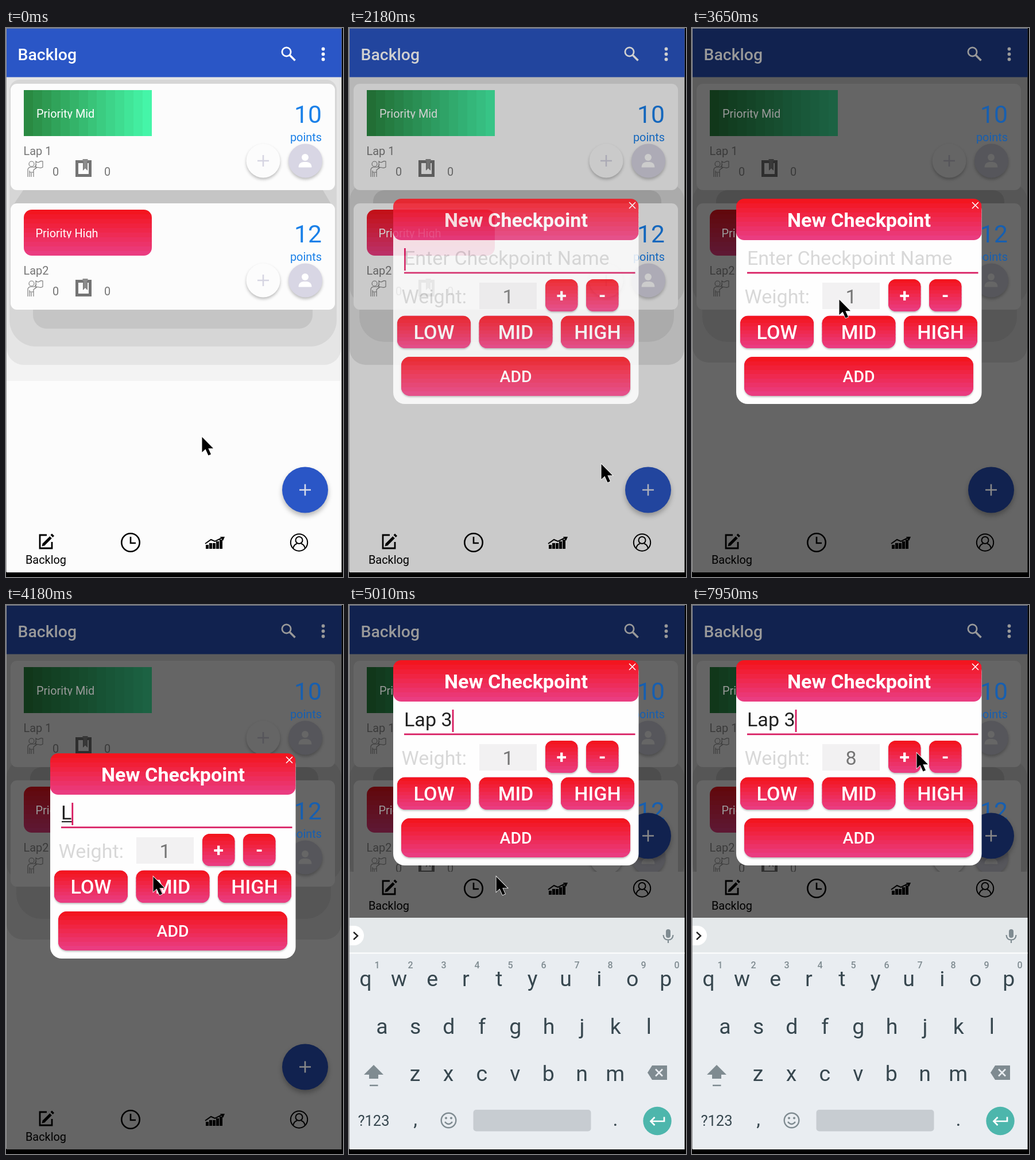
An HTML page with a canvas for the animation above (8 s loop, 587 px wide and 955 px high).

```html
<!DOCTYPE html>
<html lang="en">
<head>
<meta charset="utf-8">
<title>Backlog</title>
<style>
html, body { margin: 0; width: 100%; height: 100%; overflow: hidden; background: #000; }
canvas { display: block; }
</style>
</head>
<body>
<canvas id="stage" width="587" height="955"></canvas>
<script>
const W = 587, H = 955, LOOP = 8000, RESIZE = 402;
const stage = document.getElementById('stage').getContext('2d');
const layerCanvas = Object.assign(document.createElement('canvas'), { width: W, height: H });
const layer = layerCanvas.getContext('2d');
let g = stage;
let dim = 0;

// Timelines: each entry holds from its time until the next one.
const POINTER = [
  [0, 341, 711], [150, 336, 735], [270, 327, 762], [390, 343, 757],
  [540, 398, 752], [660, 446, 746], [780, 482, 738], [930, 492, 730],
  [1050, 500, 725], [1210, 500, 784], [1350, 525, 775], [1470, 525, 769],
  [1620, 513, 793], [2180, 439, 758], [2330, 306, 600], [2450, 258, 495],
  [2600, 256, 472], [5970, 292, 405], [6090, 343, 326], [6240, 342, 292],
  [6360, 341, 270], [6480, 344, 262], [6630, 368, 258], [6750, 391, 257]
];
const LEVEL = [[0, 0], [2180, 1], [2330, 2]];
const DIALOG_Y = [[0, 297], [4180, 258], [4300, 110], [4450, 96]];
const KEYBOARD_Y = [[0, H], [4300, 640], [4450, 544]];
const ENTRY = [[0, ''], [4180, 'L'], [5010, 'Lap 3']];
const CARET = [[0, 1], [2600, 0], [3130, 1], [3650, 0], [4180, 1], [5410, 0],
  [5970, 1], [6480, 0], [6870, 1], [7410, 0], [7950, 1]];
const WEIGHT = [[0, 1], [6870, 2], [6990, 3], [7140, 4], [7410, 5], [7560, 6], [7680, 7], [7950, 8]];
const at = (list, t) => list.findLast(e => e[0] <= t);

const DIMS = [0, 0.2, 0.6];
const INKS = [
  { white: '#fff', blue: '#1a80e8', grey: '#757575' },
  { white: '#d0d0d0', blue: '#1467bd', grey: '#646464' },
  { white: '#999', blue: '#175fb0', grey: '#3a3a3a' }
];
const RED = ['#f3151f', '#ea3c80'];
const GREEN = ['#2a8a42', '#45f5a8'];

const rgb = hex => [1, 3, 5].map(i => parseInt(hex.slice(i, i + 2), 16));
const css = c => `rgb(${c.map(v => Math.round(v * (1 - dim)))})`;
const shade = hex => css(rgb(hex));

function rect(x, y, w, h, color, r = 0) {
  g.fillStyle = color;
  g.beginPath();
  g.roundRect(x, y, w, h, r);
  g.fill();
}

function disc(x, y, r, color) {
  g.fillStyle = color;
  g.beginPath();
  g.arc(x, y, r, 0, 7);
  g.fill();
}

function ring(x, y, r, color, width) {
  g.strokeStyle = color;
  g.lineWidth = width;
  g.beginPath();
  g.arc(x, y, r, 0, 7);
  g.stroke();
}

function line(d, color, width) {
  g.strokeStyle = color;
  g.lineWidth = width;
  g.stroke(new Path2D(d));
}

function shape(d, color) {
  g.fillStyle = color;
  g.fill(new Path2D(d), 'evenodd');
}

function text(s, x, y, size, color, align = 'left', weight = 400) {
  g.font = `${weight} ${size}px Roboto, sans-serif`;
  g.textAlign = align;
  g.fillStyle = color;
  g.fillText(s, x, y);
}

function shadowed(blur, dy, alpha, draw) {
  g.save();
  g.shadowColor = `rgba(0,0,0,${alpha})`;
  g.shadowBlur = blur;
  g.shadowOffsetY = dy;
  draw();
  g.restore();
}

function bands(x, y, w, h, r, [from, to], n, across) {
  const a = rgb(from), b = rgb(to);
  g.save();
  g.beginPath();
  g.roundRect(x, y, w, h, r);
  g.clip();
  for (let i = 0; i < n; i++) {
    const k = i / (n - 1);
    g.fillStyle = css(a.map((v, j) => v + (b[j] - v) * k));
    if (across) g.fillRect(Math.round(x + w * i / n), y, Math.ceil(w / n) + 1, h);
    else g.fillRect(x, Math.round(y + h * i / n), w, Math.ceil(h / n) + 1);
  }
  g.restore();
}

function plus(x, y, r, color, width) {
  line(`M${x - r} ${y}h${2 * r}M${x} ${y - r}v${2 * r}`, color, width);
}

function listShadow(level) {
  if (!level) {
    rect(1, 85, 583, 529, shade('#f3f3f3'));
    rect(1, 85, 583, 501, shade('#e5e5e5'), [0, 0, 30, 30]);
    rect(6, 90, 570, 464, shade('#d6d6d6'), [18, 18, 46, 46]);
    shape('M30 282H552L566 306H14Z', shade('#c5c5c5'));
    rect(47, 480, 487, 43, shade('#c5c5c5'), [0, 0, 24, 24]);
    return;
  }
  const bottom = level === 1 ? 586 : 582;
  rect(1, 85, 583, bottom - 85, shade('#e5e5e5'), [0, 0, 28, 28]);
  rect(1, 270, 583, 210, shade('#d6d6d6'), 30);
  rect(18, 470, 548, 76, shade('#d6d6d6'), [0, 0, 44, 44]);
  rect(42, 282, 502, 24, shade('#c0c0c0'), [20, 20, 0, 0]);
}

function card(y, label, name, points, ink, green) {
  rect(8, y, 565, 185, shade('#fcfcfc'), 11);
  if (green) bands(31, y + 11, 223, 80, 0, GREEN, 14, true);
  else bands(31, y + 11, 223, 80, 14, RED, 10);

  g.save();
  g.beginPath();
  g.rect(31, y + 11, 223, 49.5);
  g.clip();
  text(label, green ? 53 : 51.5, y + 58.5, 19.9, ink.white);
  g.restore();

  text(points, 550, y + 68, 42.6, ink.blue, 'right');
  text('points', 550, y + 100, 19.9, ink.blue, 'right');
  text(name, 30.5, y + 124, 19.9, ink.grey);
  text('0', 81, y + 160, 19.9, ink.grey);
  text('0', 171, y + 160, 19.9, ink.grey);

  g.save();
  g.translate(0, y);
  ring(44.5, 139.5, 4.5, ink.grey, 1.1);
  line('M38 162V149Q39 145 44 145H50L53 140M41 162V151M41 154H48M44 162V155M48 162V150L54 145' +
    'M52 148V135Q55 138 58 136T64 135V145Q61 147 58 146T53 146', ink.grey, 1.1);
  shape('M121 133h28v29h-28ZM126 138v19h18v-19h-2v13l-4-4-4 4v-13Z', shade('#747474'));
  rect(133.5, 131, 9, 4, shade('#8c8c8c'));
  shape('M135 134h6v15l-3-3-3 3Z', shade('#8c8c8c'));
  g.restore();

  const cy = y + 134;
  shadowed(5, 3, 0.25, () => disc(448, cy, 29.5, shade('#fcfcfc')));
  plus(448, cy, 10, shade('#d6d5e2'), 2.6);
  shadowed(5, 3, 0.25, () => disc(521.5, cy, 29.5, shade('#d8d6e4')));
  disc(521, cy - 6, 6, shade('#ffffff'));
  rect(509.5, cy + 2, 23, 9.5, shade('#ffffff'), [9, 9, 1, 1]);
}

function nav(top) {
  rect(1, top, 583, 80, shade('#fcfcfc'));
  g.save();
  g.translate(0, top - 866);
  line('M71 882H59V905H80V894', '#000', 2.8);
  line('M66 898L78 886', '#000', 5);
  shape('M62.5 901.5L64 895.5 68.5 900ZM77.5 882L80 879.5 84 883.5 81.5 886Z', '#000');
  ring(217, 895, 15.7, '#000', 2.6);
  line('M217 885V896H226', '#000', 2.6);
  [[348, 7], [354, 10], [360, 10], [366, 13], [372, 16]].forEach(([x, h]) => rect(x, 906 - h, 5, h, '#000'));
  line('M347 897L357 890 364 893 376 887', '#000', 2);
  shape('M373 885h8l-3 7Z', '#000');
  ring(510.5, 895, 14.7, '#000', 2);
  ring(510.5, 891, 6, '#000', 2);
  line('M500 905Q502 898 507 897M521 905Q519 898 514 897', '#000', 2);
  text('Backlog', 69.5, 932, 19.9, '#000', 'center');
  g.restore();
}

function app(level, shift) {
  const ink = INKS[level];
  dim = DIMS[level];
  rect(0, 0, W, H, '#000');
  rect(0, 0, 1, 946, '#999');
  rect(0, 0, 585, 1, '#888');
  rect(1, 1, 583.5, 946, shade('#fcfcfc'));

  g.save();
  g.beginPath();
  g.rect(1, 85, 583.5, 781 - shift);
  g.clip();
  listShadow(level);
  card(97, 'Priority Mid', 'Lap 1', '10', ink, true);
  card(305, 'Priority High', 'Lap2', '12', ink, false);
  g.restore();

  rect(1, 1, 583.5, 84.5, shade('#2a56c6'));
  text('Backlog', 20.5, 56, 28.4, ink.white, 'left', 500);
  ring(488.5, 41.5, 7.6, ink.white, 2.8);
  line('M494 47L503.5 56.5', ink.white, 3.6);
  [36.5, 45.5, 54.5].forEach(y => disc(552.5, y, 2.9, ink.white));

  nav(866 - shift);
  const fabY = 803.5 - shift;
  shadowed(8, 5, 0.28, () => disc(521, fabY, 40, shade('#2a56c6')));
  plus(521, fabY, 10, level === 2 ? '#888' : shade('#d8dcea'), 2.6);
  dim = 0;
}

function button(x, y, w, h, r, label, size, weight = 500) {
  shadowed(3, 2, 0.25, () => rect(x, y, w, h, RED[1], r));
  bands(x, y, w, h, r, RED, 9);
  text(label, x + w / 2, y + h / 2 + size * 0.355, size, '#fff', 'center', weight);
}

function dialog(t) {
  const entry = at(ENTRY, t)[1];
  g.save();
  g.translate(0, at(DIALOG_Y, t)[1]);
  rect(77, 0, 427.5, 357, '#fefefe', 20);
  bands(77, 0, 427.5, 72, 14, RED, 9);
  text('New Checkpoint', 291, 49, 34.1, '#fff', 'center', 700);
  line('M488 6L499 17M499 6L488 17', '#fff', 1.6);

  text(entry || 'Enter Checkpoint Name', 96, 115, 34.1, entry ? '#212121' : '#d8d8d8');
  const caretX = 96 + (entry ? g.measureText(entry).width : 0);
  if (t >= 4180 && t < 4450) rect(97, 118, 18, 2, '#212121');
  rect(96, 127.5, 402.5, 2.8, '#d81b60');
  if (at(CARET, t)[1]) rect(caretX, 86, 2.8, 39, '#d81b60');

  text('Weight:', 91.5, 182, 34.1, '#d8d8d8');
  if (t < 2330 || t >= 2450) rect(227, 146, 100, 46, '#f2f1f2');
  text(at(WEIGHT, t)[1], 277, 182, 34.1, '#757575', 'center');
  button(342, 140, 56.5, 56, 13, '+', 32, 700);
  button(413, 140, 56.5, 56, 13, '-', 32, 700);
  button(84, 203.5, 128, 56.5, 14, 'LOW', 34.1);
  button(226.5, 203.5, 128, 56.5, 14, 'MID', 34.1);
  button(369, 203.5, 128, 56.5, 14, 'HIGH', 34.1);
  button(91, 275, 399, 68, 15, 'ADD', 28.4);
  g.restore();
}

function keyboard(top) {
  const key = '#37474f', soft = '#7f8b91';
  g.save();
  g.beginPath();
  g.rect(1, 1, 583.5, 946);
  g.clip();
  g.translate(0, top - 544);
  rect(1, 544, 584, 61, '#e4e8ea');
  rect(1, 605, 584, 342, '#e9edf1');
  rect(1, 604.5, 584, 2, '#fff');
  rect(0, 558, 26, 34, '#fff', [0, 17, 17, 0]);
  line('M8 569L15 575.5 8 582', '#222', 2.4);

  rect(552, 564, 8, 15, soft, 4);
  line('M547.5 574Q548 582.5 556 582.5T564.5 574M556 582V588', soft, 2.2);

  [['qwertyuiop', 29, 663], ['asdfghjkl', 57.5, 745.5], ['zxcvbnm', 115, 828]].forEach(([row, x0, y]) =>
    [...row].forEach((c, i) => text(c, x0 + 58.1 * i, y, 37.5, key, 'center')));
  for (let i = 0; i < 10; i++) text((i + 1) % 10, 49 + 58 * i, 632, 16, soft, 'center', 500);

  shape('M43 800L60 817H51V824H35V817H26Z', soft);
  rect(36, 834.5, 14.5, 2.5, soft);
  shape('M528 801H554V826H528L520 813.5Z', soft);
  line('M534 807.5L546 819.5M546 807.5L534 819.5', '#e9edf1', 2.6);

  text('?123', 43, 906, 25.5, key, 'center');
  text(',', 115.5, 906, 34, key, 'center');
  text('.', 464, 906, 34, key, 'center');
  ring(173.5, 896.5, 12.8, soft, 2.4);
  disc(169, 892.5, 2, soft);
  disc(178, 892.5, 2, soft);
  line('M167 899Q173.5 907 180 899', soft, 2.4);
  rect(216.5, 878, 205, 37.5, '#c7ccd1', 5);
  disc(537, 897.5, 24.7, '#4db6ac');
  line('M549 890.5V898H526M532.5 891L525.5 898 532.5 905', '#fff', 2.7);
  g.restore();
}

function pointer(t) {
  const [, x, y] = at(POINTER, t);
  g.save();
  g.translate(x, y);
  const arrow = 'M.5 .5V27L6.5 21.5 11.5 32.5 16 30.5 11.3 20.3H20Z';
  line(arrow, '#fff', 1.6);
  shape(arrow, '#000');
  g.restore();
}

function frame() {
  const t = performance.now() % LOOP;
  const level = at(LEVEL, t)[1];
  g = stage;
  app(level, t >= 4450 ? RESIZE : 0);
  if (level) {
    g = layer;
    g.clearRect(0, 0, W, H);
    dialog(t);
    g = stage;
    g.globalAlpha = level === 1 ? 0.85 : 1;
    g.drawImage(layerCanvas, 0, 0);
    g.globalAlpha = 1;
  }
  const top = at(KEYBOARD_Y, t)[1];
  if (top < H) keyboard(top);
  pointer(t);
  requestAnimationFrame(frame);
}
requestAnimationFrame(frame);
</script>
</body>
</html>
```
